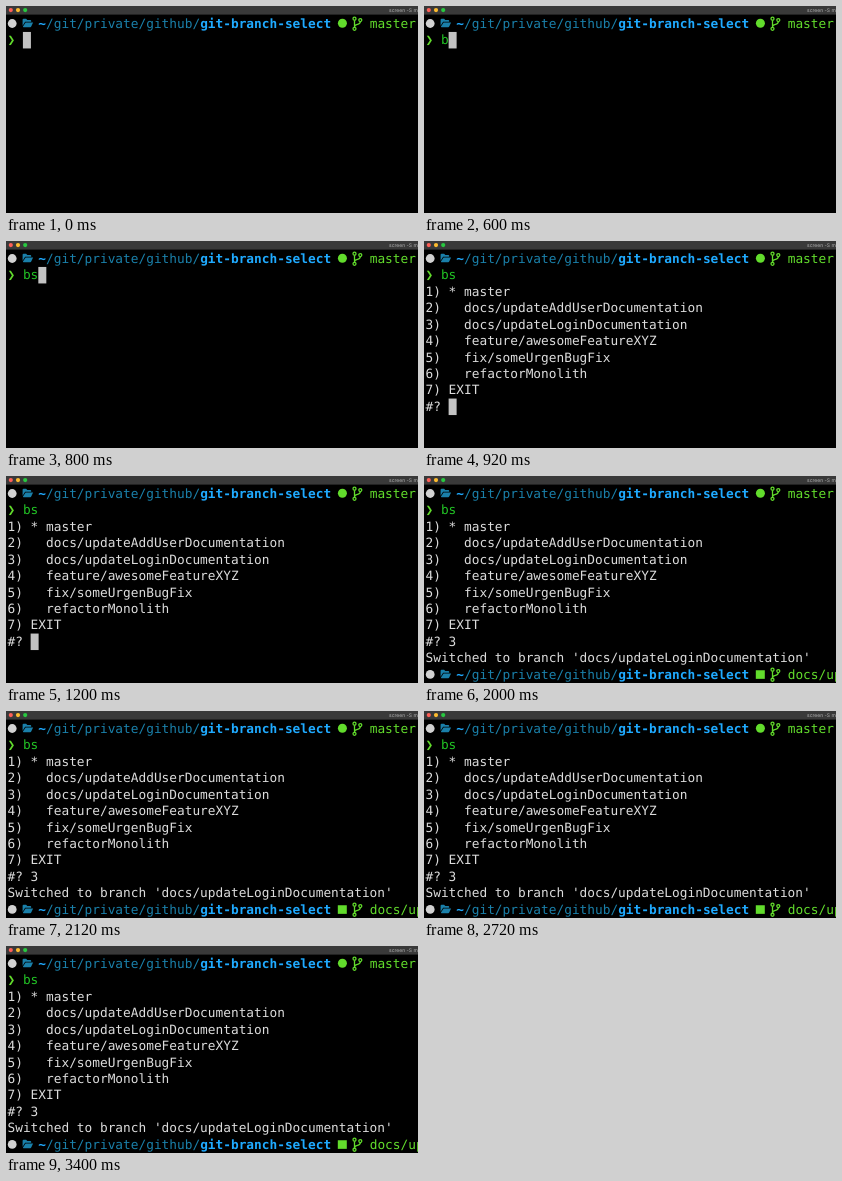
An HTML page for the animation above (3520 ms loop, 412x207 px).

```html
<!DOCTYPE html>
<html lang="en">
<head>
<meta charset="utf-8">
<title>Branch selection in a terminal</title>
<style>
  html, body { margin: 0; width: 100%; height: 100%; overflow: hidden; background: #000; }
  svg { display: block; width: 412px; height: 207px; }
  text {
    font: 12.8px "DejaVu Sans Mono", monospace;
    white-space: pre;
    text-rendering: geometricPrecision;
  }
  .title { font: 5px Inter, "Liberation Sans", sans-serif; fill: #b4b4b4; }
  .plain { fill: #dcdcdc; }
  .dim { fill: #1a80aa; }
  .blue { fill: #1faaff; font-weight: bold; }
  .lime { fill: #62dc2c; }
  .green { fill: #22c425; }
  .cursor { fill: #c3c3c3; }
</style>
</head>
<body>
<svg id="stage" viewBox="0 0 412 207"></svg>
<script>
const LOOP = 3520;
const CELL = 7.706, LEFT = 1.5, ROW = 16.45, TOP = 9.5;
const stage = document.getElementById("stage");

const colX = col => LEFT + col * CELL;
const rowY = row => TOP + row * ROW;

const type = (row, col, text, cls = "plain") =>
  `<text x="${colX(col)}" y="${rowY(row) + 12.3}" class="${cls}">${text}</text>`;

const cursor = (row, col) =>
  `<rect x="${colX(col)}" y="${rowY(row)}" width="8" height="16.5" class="cursor"/>`;

const folder = `
  <path class="dim" d="M16.6 4.2q0-1 1-1h2.5l1.2 1.3h3q.9 0 .9 1v.8h-6.1l-2.5 4z"/>
  <path class="dim" d="M19.6 7.1h7.5l-1.9 4q-.3.6-1 .6h-6.7q-.8 0-.5-.7z"/>`;

const fork = `
  <g fill="none" stroke="#62dc2c" stroke-width="1.3">
    <circle cx="348.5" cy="3.2" r="1.5"/>
    <circle cx="354.3" cy="4.6" r="1.5"/>
    <circle cx="348.5" cy="13.3" r="1.5"/>
    <path d="M348.5 4.7v7.1M354.3 6.1q0 2.4-2.8 2.8q-3 .4-3 2.6"/>
  </g>`;

// Path line: host badge, folder, directory, remote badge, branch name
const promptLine = (row, badge, branch) => `
  <g transform="translate(0 ${rowY(row)})">
    <circle cx="6.2" cy="8" r="4.4" fill="#d2d2d2"/>
    ${folder}${badge}${fork}
  </g>` +
  type(row, 4, "~", "blue") +
  type(row, 5, "/git/private/github/", "dim") +
  type(row, 25, "git-branch-select", "blue") +
  type(row, 47, branch, "lime");

const roundBadge = `<circle cx="336.4" cy="7.8" r="4.5" class="lime"/>`;
const squareBadge = `<rect x="331.8" y="3.8" width="9" height="8.6" class="lime"/>`;

const titleBar = `
  <rect width="412" height="8.6" fill="#393939"/>
  <circle cx="4.8" cy="4.1" r="2.1" fill="#ff5f57"/>
  <circle cx="12" cy="4.1" r="2.1" fill="#febc2e"/>
  <circle cx="19.2" cy="4.1" r="2.1" fill="#28c840"/>
  <text x="383" y="6" class="title">screen -S master</text>`;

const menu = [
  "1) * master",
  "2)   docs/updateAddUserDocumentation",
  "3)   docs/updateLoginDocumentation",
  "4)   feature/awesomeFeatureXYZ",
  "5)   fix/someUrgenBugFix",
  "6)   refactorMonolith",
  "7) EXIT",
  "#? "
].map((line, i) => type(i + 2, 0, line)).join("");

const base = `<rect width="412" height="207"/>` + titleBar +
  promptLine(0, roundBadge, "master") +
  type(1, 0, "❯", "lime");

const bs = type(1, 2, "bs", "green");
const answer = type(9, 3, "3");
const result = type(10, 0, "Switched to branch 'docs/updateLoginDocumentation'") +
  promptLine(11, squareBadge, "docs/updateLoginDocumentation");

// Start time in ms and the terminal content from then on
const steps = [
  [0, cursor(1, 2)],
  [600, type(1, 2, "b", "green") + cursor(1, 3)],
  [720, bs + cursor(1, 4)],
  [920, bs + menu + cursor(9, 3)],
  [1720, bs + menu + answer + cursor(9, 4)],
  [1920, bs + menu + answer + result]
];

let shown = -1;
function draw() {
  const time = performance.now() % LOOP;
  const index = steps.findLastIndex(([start]) => time >= start);
  if (index !== shown) {
    shown = index;
    stage.innerHTML = base + steps[index][1];
  }
  requestAnimationFrame(draw);
}
draw();
</script>
</body>
</html>
```
